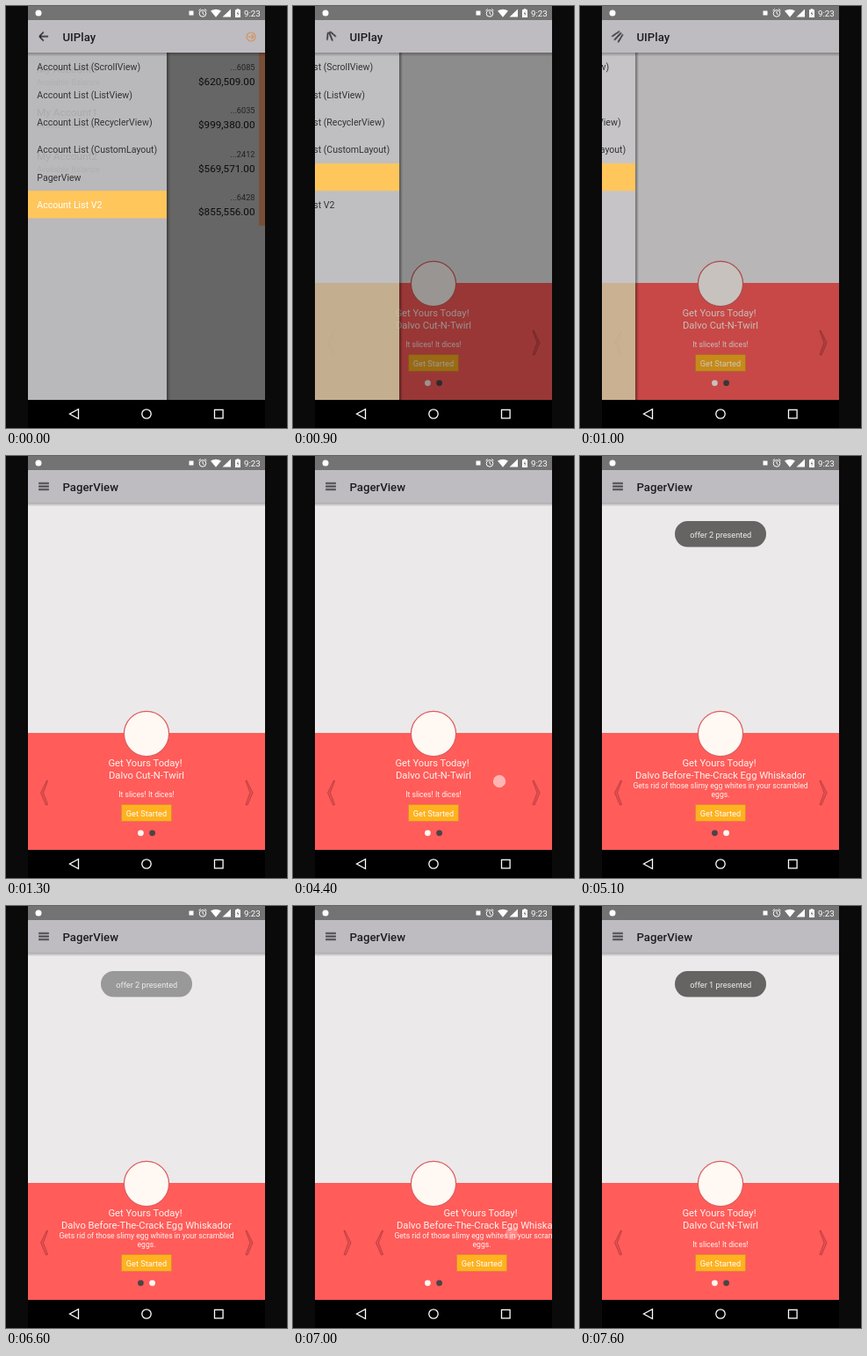
An HTML page for the animation above (8 s loop, 320x480 px).

```html
<!DOCTYPE html>
<html lang="en">
<head>
<meta charset="utf-8">
<title>Drawer and pager</title>
<style>
  html, body { margin: 0; width: 100%; height: 100%; overflow: hidden; background: #0a0a0a; }
  svg { display: block; width: 100%; height: 100%; }
  text { font-family: Roboto, Arial, sans-serif; }
  .title { font-size: 13.2px; font-weight: 500; fill: #1d1c1f; }
  .item { font-size: 10.55px; fill: #333; }
  .small { font-size: 9.2px; }
  .offer text { fill: #fff3ee; text-anchor: middle; font-size: 11.2px; }
  .offer .note { font-size: 8.6px; }
  .offer .label { font-size: 9.2px; fill: #fff; }
  .end { text-anchor: end; }
  .mid { text-anchor: middle; }
</style>
</head>
<body>
<svg viewBox="0 0 320 480">
  <defs>
    <clipPath id="view"><rect x="25" y="53" width="270" height="395"/></clipPath>
    <linearGradient id="drop" x2="0" y2="1">
      <stop stop-color="#000" stop-opacity=".28"/><stop offset="1" stop-color="#000" stop-opacity="0"/>
    </linearGradient>
    <linearGradient id="side">
      <stop stop-color="#000" stop-opacity=".4"/><stop offset="1" stop-color="#000" stop-opacity="0"/>
    </linearGradient>
    <path id="chevron" d="M46.5 369 39.5 383 45.5 397 47.5 396.5 42.5 383 47.5 369.5Z"
      fill="#e85050" stroke="#a83a3a" stroke-width=".7"/>
  </defs>
  <rect width="320" height="480" fill="#0a0a0a"/>
  <rect x="25" y="448" width="270" height="32" fill="#000"/>

  <g clip-path="url(#view)">
    <g id="pager">
      <rect x="25" y="53" width="270" height="262" fill="#ebe9ea"/>
      <rect x="25" y="315" width="270" height="133" fill="#ff5c5a"/>
      <g id="track"></g>
      <circle cx="160" cy="316" r="25.6" fill="#fff8f3" stroke="#dc5f60" stroke-width="1.3"/>
      <circle id="dotA" cx="153.4" cy="428.8" r="3.4"/>
      <circle id="dotB" cx="166.6" cy="428.8" r="3.4"/>
    </g>
    <rect id="scrim" x="25" y="53" width="270" height="395"/>
    <g id="accounts">
      <rect x="25" y="53" width="270" height="395" fill="#666"/>
      <rect x="288" y="53" width="7" height="197" fill="#794e39"/>
    </g>
    <g id="drawer">
      <rect x="25" y="53" width="158" height="262" fill="#c8c7cb" fill-opacity=".85"/>
      <rect id="foot" x="25" y="315" width="158" height="133" fill-opacity=".85"/>
      <rect x="183" y="53" width="4" height="395" fill="url(#side)"/>
      <rect id="mark" x="25" y="210" width="158" height="31.4" fill="#ffc65c"/>
    </g>
    <g id="toast">
      <rect x="108" y="74" width="104" height="29.5" rx="14.7" fill="#656463"/>
      <text id="said2" class="small mid" x="160.3" y="92.6" fill="#eee">offer 2 presented</text>
      <text id="said1" class="small mid" x="160.3" y="92.6" fill="#eee">offer 1 presented</text>
    </g>
    <circle id="touch" r="6.8" fill="#fff" fill-opacity=".55" stroke="#fff" stroke-opacity=".3"/>
  </g>

  <rect x="25" y="53" width="270" height="4.5" fill="url(#drop)"/>
  <rect x="25" y="16" width="270" height="37" fill="#bebcc1"/>
  <g id="icons" fill="none" stroke="#222" stroke-width="1.4"></g>
  <text id="appName" class="title" x="64.5" y="39.5">UIPlay</text>
  <text id="pageName" class="title" x="64.5" y="39.5">PagerView</text>
  <g id="exit" fill="none" stroke="#d6935f" stroke-width="1.2">
    <circle cx="279" cy="35" r="5"/><path d="M275 35H282M279.5 32.5 282 35 279.5 37.5"/>
  </g>

  <rect x="25" width="270" height="16" fill="#737373"/>
  <g fill="#fff">
    <circle cx="37" cy="8" r="3.5"/>
    <rect x="208.5" y="5.5" width="5" height="5"/>
    <path d="M233 5.6Q239 1.8 245 5.6L239 12.7ZM256 3.5V12.6H246.5ZM261 4.2H262.6V3.2H265.4V4.2H267V13H261Z"/>
    <text x="271" y="11.7" font-size="9.7">9:23</text>
  </g>
  <path d="M264.5 5.5 262.7 9H264L263.5 11.7 265.4 8.2H264.1Z" fill="#737373"/>
  <g fill="none" stroke="#fff">
    <circle cx="224" cy="8.4" r="3.8"/><path d="M224 6V8.6L225.8 9.8M219.5 5.2 221.7 3.4M228.5 5.2 226.3 3.4"/>
    <g stroke-width="1.3">
      <path d="M82.5 458.5V469.5L72.5 464Z"/>
      <circle cx="160" cy="464" r="5.2"/>
      <rect x="237.5" y="459.3" width="9.6" height="9.6"/>
    </g>
  </g>
</svg>

<script>
const LOOP = 8000;
const $ = id => document.getElementById(id);
const add = (id, markup) => $(id).insertAdjacentHTML('beforeend', markup);

// Each step [time, value] holds until the next one.
function play(id, prop, steps) {
  const frames = steps.map(([t, v]) => ({ offset: t / LOOP, [prop]: v, easing: 'steps(1, end)' }));
  frames.push({ offset: 1, [prop]: steps[steps.length - 1][1] });
  $(id).animate(frames, { duration: LOOP, iterations: Infinity });
}
const slide = (id, steps) =>
  play(id, 'transform', steps.map(([t, x, y = 0]) => [t, `translate(${x}px, ${y}px)`]));
const show = (id, from, to = LOOP) => {
  const steps = from ? [[0, 0], [from, 1]] : [[0, 1]];
  if (to < LOOP) steps.push([to, 0]);
  play(id, 'opacity', steps);
};

// Pager
function offer(x, name, lines) {
  const notes = lines.map((s, i) =>
    `<text class="note" x="160" y="${388 - 10 * (lines.length - 1 - i)}">${s}</text>`).join('');
  add('track', `<g class="offer" transform="translate(${x})">
    <text x="158.5" y="353">Get Yours Today!</text>
    <text x="160" y="366.5">${name}</text>${notes}
    <rect x="131.5" y="396.5" width="57" height="19" fill="#ffb11f" stroke="#d98a35" stroke-width=".8"/>
    <text class="label" x="160" y="409.6">Get Started</text>
    <use href="#chevron"/><use href="#chevron" transform="translate(320.5) scale(-1 1)"/></g>`);
}
offer(0, 'Dalvo Cut-N-Twirl', ['It slices! It dices!']);
offer(270, 'Dalvo Before-The-Crack Egg Whiskador',
  ['Gets rid of those slimy egg whites in your scrambled', 'eggs.']);

// Account rows
['6085', '6035', '2412', '6428'].forEach((no, i) => {
  const y = 49.3 * i;
  const sum = ['$620,509.00', '$999,380.00', '$569,571.00', '$855,556.00'][i];
  add('accounts', `<text class="end small" x="283.5" y="${73 + y}" fill="#222">...${no}</text>
    <text class="end" x="283.5" y="${90 + y}" font-size="11.7" fill="#0c0c0c">${sum}</text>
    <text x="35" y="${76 + y}" font-size="11.8">My Account${i}</text>
    <text class="small" x="35" y="${90 + y}" fill="#222">Available Balance</text>`);
});

// Drawer items
['Account List (ScrollView)', 'Account List (ListView)', 'Account List (RecyclerView)',
  'Account List (CustomLayout)', 'PagerView', 'Account List V2'].forEach((s, i) =>
  add('drawer', `<text id="item${i}" class="item" x="35.3" y="${73.2 + 31.4 * i}">${s}</text>`));

// Menu icon: p = 0 is three bars, p = 1 is a back arrow
function menuPath(p) {
  const mix = (a, b) => a + (b - a) * p;
  const half = mix(5.9, 5.1), size = mix(11.8, 7), turn = mix(0, Math.PI / 4), gap = mix(3.5, 0);
  const dx = size * Math.cos(turn), dy = size * Math.sin(turn);
  return `M${-half} 0h${2 * half}M${-half} ${gap}l${dx} ${dy}M${-half} ${-gap}l${dx} ${-dy}`;
}
const morph = [[0, 1], [900, .62], [1000, .26], [1100, .1], [1200, .03], [1300, 0]];
morph.forEach(([t, p], i) => {
  add('icons', `<path id="icon${i}" d="${menuPath(p)}"
    transform="translate(43 34.6) rotate(${180 * (1 - p)})"/>`);
  show('icon' + i, t, morph[i + 1]?.[0]);
});

// Drawer closes
show('accounts', 0, 800);
show('exit', 0, 800);
show('appName', 0, 1300);
show('pageName', 1300);
slide('drawer', [[0, 0], [900, -62], [1000, -120], [1100, -146], [1200, -156], [1300, -165]]);
slide('mark', [[0, 0], [800, 0, -31.4]]);
play('foot', 'fill', [[0, '#c8c7cb'], [800, '#cbc5a0']]);
play('item4', 'fill', [[0, '#333'], [800, '#fff']]);
play('item5', 'fill', [[0, '#fff'], [800, '#333']]);
play('scrim', 'opacity', [[0, .6], [900, .4], [1000, .22], [1100, .08], [1200, .02], [1300, 0]]);

// Swipe to the second offer and back
slide('track', [[0, 0], [4500, -30], [4600, -120], [4700, -205], [4800, -252], [4900, -268], [5000, -270],
  [6800, -267], [6900, -250], [7000, -215], [7100, -110], [7200, -45], [7300, -12], [7400, 0]]);
const dots = (a, b) => [[0, a], [4600, b], [7000, a]];
play('dotA', 'fill', dots('#fff8f3', '#4a4547'));
play('dotB', 'fill', dots('#4a4547', '#fff8f3'));
slide('touch', [[0, 235, 370], [4500, 198, 370], [4600, 160, 370],
  [6700, 188, 372], [6800, 196, 372], [6900, 216, 373], [7000, 249, 373]]);
play('touch', 'opacity', [[0, 0], [4400, 1], [4500, .9], [4600, .35], [4700, 0],
  [6700, 1], [7000, .45], [7100, 0]]);
play('toast', 'opacity', [[0, 0], [5000, .5], [5100, 1], [6600, .6], [6700, .2], [6800, 0], [7500, .5], [7600, 1]]);
show('said2', 0, 7000);
show('said1', 7000);
</script>
</body>
</html>
```
